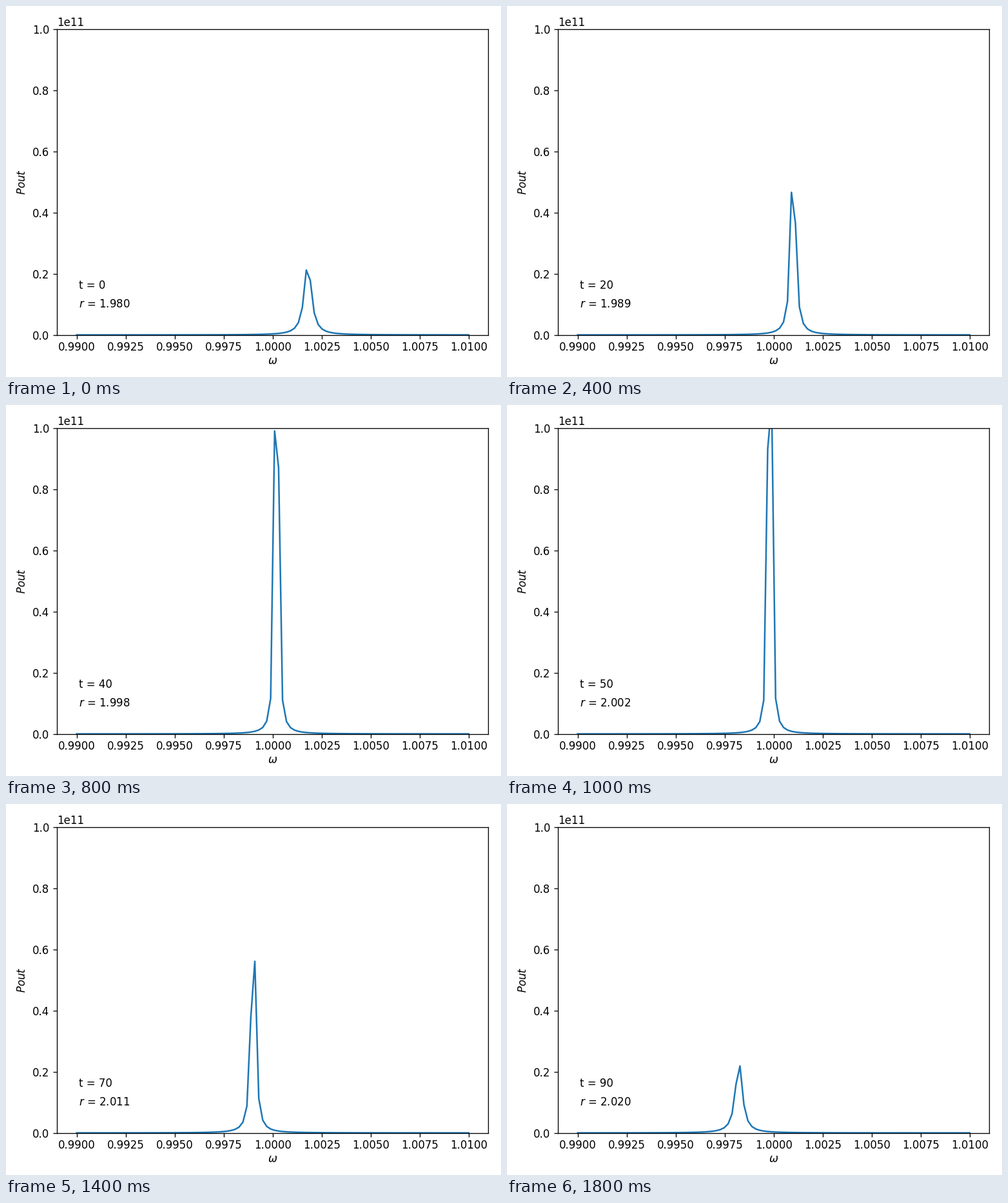
Animation, 768 px wide and 576 px high, one loop 2 s. Source, as a matplotlib script:

```python
import numpy as np
import matplotlib.pyplot as plt
from matplotlib.animation import FuncAnimation

W, H, DPI = 768, 576, 120
LEFT, RIGHT, TOP, BOTTOM = 79.2, 748.2, 36.0, 510.67
FRAMES, INTERVAL = 10, 200

plt.rcParams["font.family"] = "DejaVu Sans"

omega = np.linspace(0.99, 1.01, 100)
detuning = np.arange(100) - 49.5  # in sample steps away from omega = 1
ratios = np.linspace(1.98, 2.02, FRAMES)


def power(r):
    """Lorentzian resonance whose centre and width drift with r."""
    d = r - 2
    centre = -441.7 * d + 115 * d**2
    width = -0.05 + 52.4 * d + 75 * d**2
    scale = 3.90 + 8.5 * d - 150 * d**2
    return 1e11 / (scale * ((detuning - centre) ** 2 + width**2))


fig = plt.figure(figsize=(W / DPI, H / DPI), dpi=DPI, facecolor="white")
ax = fig.add_axes([LEFT / W, 1 - BOTTOM / H, (RIGHT - LEFT) / W, (BOTTOM - TOP) / H])
ax.set_xlim(0.989, 1.011)
ax.set_ylim(0, 1e11)
ax.tick_params(axis="x", pad=2.9)
ax.set_xlabel(r"$\omega$", labelpad=1.6)
ax.set_ylabel("$Pout$")

line, = ax.plot(omega, power(ratios[0]), color="#1f77b4", lw=1.5)
time_text = ax.text(0.05, 0.15, "", transform=ax.transAxes)
ratio_text = ax.text(0.05, 0.09, "", transform=ax.transAxes)


def update(i):
    line.set_ydata(power(ratios[i]))
    time_text.set_text(f"t = {10 * i}")
    ratio_text.set_text(f"$r$ = {ratios[i]:.3f}")
    return line, time_text, ratio_text


anim = FuncAnimation(fig, update, frames=FRAMES, interval=INTERVAL, repeat=True, repeat_delay=0)
plt.show()
```
